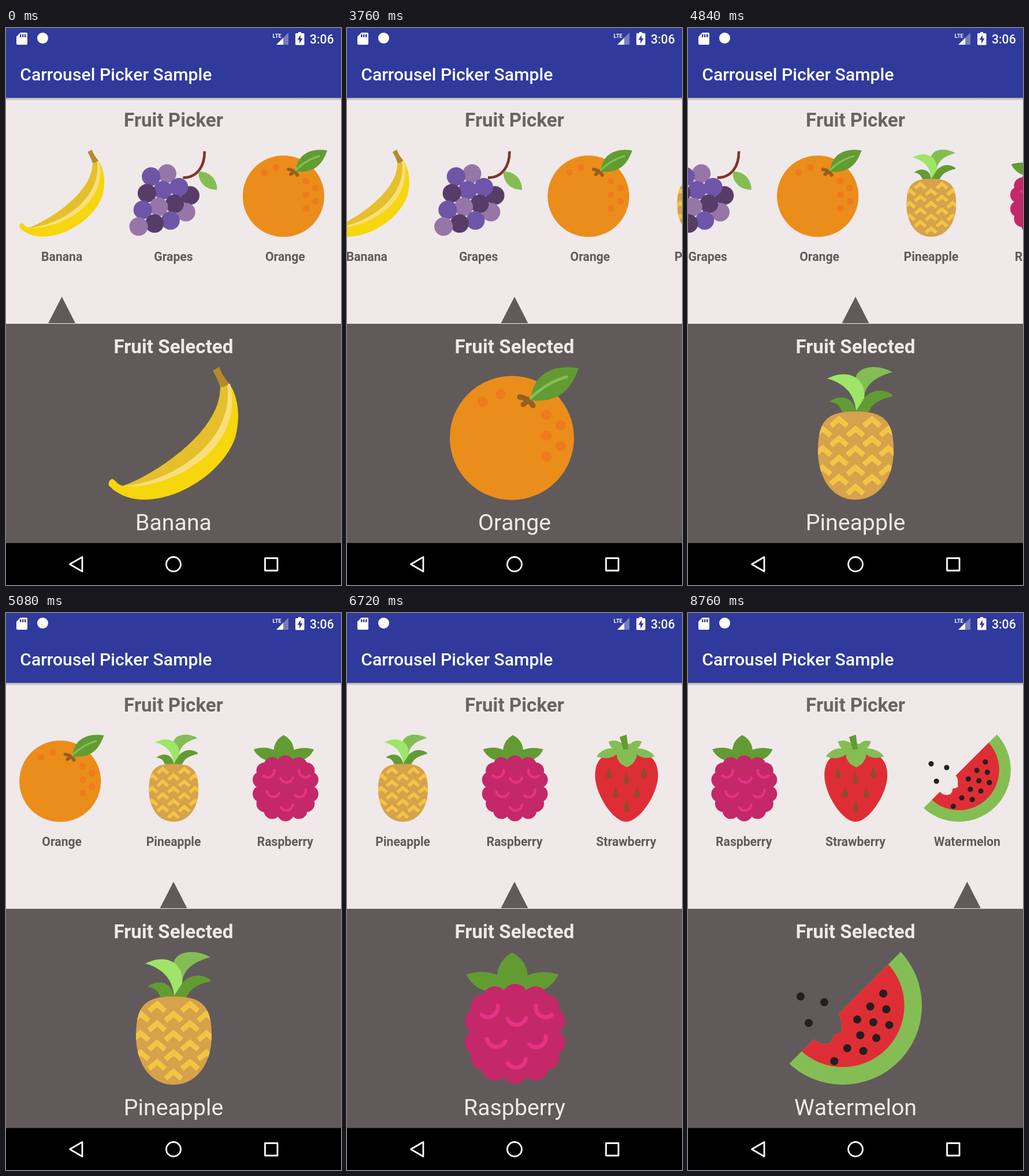
Recreate the animation shown at these times as an HTML page. Size 580 by 966 pixels, loop 8.8 s.

```html
<!DOCTYPE html>
<html lang="en">
<head>
<meta charset="utf-8">
<title>Carrousel Picker Sample</title>
<style>
  html, body { margin: 0; width: 100%; height: 100%; overflow: hidden; background: #000; }
  svg { display: block; width: 100vw; height: 100vh; font-family: Roboto, sans-serif; }
  .mid { text-anchor: middle; }
  .head { font-size: 33.2px; font-weight: 700; }
  .name { font-size: 21.15px; font-weight: 700; fill: #615a5a; }
  .line { fill: none; stroke-linecap: round; stroke-linejoin: round; }
  #pickedName { font-size: 39.27px; font-kerning: none; fill: #efe9e9; }
</style>
</head>
<body>
<svg viewBox="0 0 580 966">
  <defs>
    <linearGradient id="shade" x2="0" y2="1">
      <stop stop-color="#000" stop-opacity=".3"/>
      <stop offset="1" stop-color="#000" stop-opacity="0"/>
    </linearGradient>
    <clipPath id="pineBody"><path d="M290 665C338 665 356 680 356 733C356 780 331 818 290 818C249 818 225 780 225 733C225 680 242 665 290 665Z"/></clipPath>
    <clipPath id="slice"><path d="M368 588H420V830H127L218 739Q232 752 246 745Q252 738 252 730Q262 731 267 724Q264 720 266 712Q265 700 260 696Z"/></clipPath>

    <g id="Banana" transform="translate(175 588)">
      <path fill="#f6d60d" d="M196 34L211 28C228 52 231 88 222 122C202 180 128 230 64 230C36 230 14 218 3 205C2 199 5 195 9 194C15 196 18 205 28 206C75 190 198 115 196 34Z"/>
      <path fill="#e5c02c" d="M28 206C75 190 198 115 196 34L208 30C222 140 95 204 28 206Z"/>
      <path fill="#f9de7e" d="M28 206C95 204 222 140 208 30L213 29C240 145 105 214 28 206Z"/>
      <path fill="#b58a2d" d="M183 6L194 0Q200 16 211 28Q206 35 196 35Q192 22 183 6Z"/>
    </g>

    <g id="Grapes">
      <path fill="none" stroke="#81342a" stroke-width="7" d="M372 592C372 632 353 662 315 662"/>
      <path fill="#85bd55" d="M356 646C385 645 405 665 405 694C375 694 355 675 356 646Z"/>
    </g>

    <g id="Orange">
      <circle cx="285.5" cy="711" r="107.5" fill="#eb8d1b"/>
      <path class="line" stroke="#975f20" stroke-width="9" d="M299 640Q315 642 322 655M305 653L317 644"/>
      <path fill="#639b33" d="M401 590C360 583 321 598 318 646C365 650 387 630 401 590Z"/>
      <path class="line" stroke="#85bd55" stroke-width="5" d="M318 642Q345 615 380 605"/>
    </g>

    <g id="Pineapple">
      <path fill="#639b33" d="M245 648C265 634 287 640 291 666H267C262 652 255 650 245 648ZM354 636C328 618 300 636 291 666H313C319 650 335 643 354 639Z"/>
      <path fill="#85bd55" d="M354 597C325 580 288 588 290 612L305 642C306 616 330 603 354 597Z"/>
      <path fill="#9fe567" d="M241 608C275 590 309 605 305 642L291 664C288 632 268 615 241 608Z"/>
      <g clip-path="url(#pineBody)">
        <path fill="#d6a24c" d="M220 660h140v160H220Z"/>
        <path id="chevrons" fill="none" stroke="#f2c544" stroke-width="9"/>
      </g>
    </g>

    <g id="Raspberry">
      <path fill="#639b33" d="M286 589C302 597 312 612 313 628C332 621 350 622 366 627C355 650 335 660 313 656H260C235 660 215 645 207 627C225 620 245 621 260 628C261 612 270 597 286 589Z"/>
      <circle cx="291" cy="730" r="66" fill="#c42869"/>
    </g>

    <g id="Strawberry">
      <path fill="#df2d35" d="M290 818C255 818 208 745 208 695C208 665 222 640 250 640H332C360 640 374 665 374 695C374 745 325 818 290 818Z"/>
      <path fill="#85bd55" d="M212 646C222 628 245 622 255 625C248 620 245 612 244 606C258 601 270 604 280 612H302C310 602 322 603 331 606C328 615 325 620 320 624C340 624 360 635 365 646C345 652 330 650 318 640C318 655 305 670 292 674C275 668 265 655 265 640C250 652 230 652 212 646Z"/>
      <path fill="#639b33" d="M273 594L291 588L296 626L283 628Z"/>
    </g>

    <g id="Watermelon">
      <g clip-path="url(#slice)">
        <circle cx="268" cy="681" r="137" fill="#85bd55"/>
        <circle cx="268" cy="681" r="106.5" fill="#df2d35"/>
      </g>
    </g>
  </defs>

  <path fill="#efe9e9" d="M0 121h580v392H0Z"/>
  <path fill="url(#shade)" d="M0 121h580v5H0Z"/>
  <path fill="#2f3a9c" d="M0 0h580v121H0Z"/>
  <path fill="#615a5a" d="M0 513h580v380.5H0Z"/>
  <path d="M0 893.5h580V966H0Z"/>

  <g fill="#fff">
    <path d="M25 8H35Q37 8 37 10V27Q37 29 35 29H20Q18 29 18 27V15Z"/>
    <path fill="#2f3a9c" d="M24 11h2.4v5H24zM28 11h2.4v5H28zM32 11h2.4v5H32z"/>
    <circle cx="63.5" cy="17.5" r="9.5"/>
    <text x="461.5" y="16.5" font-size="9.5" font-weight="700">LTE</text>
    <path fill-opacity=".35" d="M489 8V29H468Z"/>
    <path d="M480 17V29H468Z"/>
    <path d="M506 7h5v2h4q1.5 0 1.5 1.5V28q0 1.5-1.5 1.5H502.5q-1.5 0-1.5-1.5V10.5Q501 9 502.5 9H506Z"/>
    <path fill="#2f3a9c" d="M510 12L504.5 20.5H508V27L513.5 18H510Z"/>
    <text x="526" y="26.5" font-size="21.15" font-weight="500">3:06</text>
    <text x="24.2" y="91" font-size="30.2" font-weight="500">Carrousel Picker Sample</text>
  </g>

  <text class="mid head" x="290" y="171" fill="#6b6464">Fruit Picker</text>
  <g id="list"></g>
  <path id="arrow" fill="#615a5a" d="M0 466L23.5 512H-23.5Z"/>
  <text class="mid head" x="290" y="564" fill="#efe9e9">Fruit Selected</text>
  <use id="picked"/>
  <text id="pickedName" class="mid" x="290" y="871"></text>

  <g class="line" stroke="#fff" stroke-width="2.8">
    <path d="M110.5 930L132 917.5V942.5Z"/>
    <circle cx="290" cy="930" r="12.5"/>
    <path d="M448.5 919.5h21.5v21.5h-21.5Z"/>
  </g>
</svg>
<script>
  const $ = id => document.getElementById(id);
  const add = (id, markup) => $(id).insertAdjacentHTML('beforeend', markup);
  const dot = (id, x, y, r, fill) => add(id, `<circle cx="${x}" cy="${y}" r="${r}" fill="${fill}"/>`);
  const times = (n, draw) => { for (let i = 0; i < n; i++) draw(i); };

  // Grapes: a slanted lattice whose last column droops
  const skins = { P: '#6e55a8', M: '#9676a8', D: '#573c68' };
  ['PM', 'DPPD', 'PMDM', 'MDP'].forEach((row, r) => {
    for (let c = row.length - 1; c >= 0; c--) {
      const droop = c * (c - 1) * (c - 2);
      dot('Grapes', 231 - 11 * r + 42 * c - 2 * droop, 659 + 44 * r - 8 * c + 5 * droop, 24.5, skins[row[c]]);
    }
  });

  // Orange pores: two at the top, a zigzag on the right
  times(2, i => dot('Orange', 235 + 31 * i, 648 - 13 * i, 9, '#f07a1e'));
  times(5, i => dot('Orange', 345 + 25 * (i % 2), 671 + 18 * i, 9, '#f07a1e'));

  let chevrons = '';
  times(5, col => times(4, row => {
    chevrons += `M${219 + col * 28.5} ${(col % 2 ? 690 : 707) + row * 33.5}l14-12l14 12`;
  }));
  $('chevrons').setAttribute('d', chevrons);

  // Raspberry outline: a ring of bumps, squarer at the top
  const bend = (v, power) => Math.sign(v) * Math.abs(v) ** power;
  times(14, i => {
    const angle = Math.PI * (i / 7 + .5), up = Math.sin(angle);
    dot('Raspberry', 291 + 66 * bend(Math.cos(angle), .75), 730 + 65 * bend(up, up < 0 ? .7 : 1), 22, '#c42869');
  });

  // Rows of three, two and one marks
  function triangle(centre, top, step, widen, draw) {
    let index = 0;
    times(3, r => times(3 - r, c => {
      const x = centre + (c - (2 - r) / 2) * (step + widen * r);
      const y = top + 60 * r - 8 * r * r + 14 * c * (2 - r - c);
      draw(x, y, index++);
    }));
  }
  triangle(294, 689, 47, 25, (x, y, i) => add('Raspberry',
    `<path class="line" stroke="#e63383" stroke-width="7" d="M-16 0A17 17 0 0 0 16 0"
      transform="translate(${x} ${y}) rotate(${-29 * Math.cos(i * 85 * Math.PI / 180)})"/>`));
  triangle(290.5, 687, 46.5, 9.5, (x, y) => add('Strawberry',
    `<path fill="#97492b" transform="translate(${x} ${y})" d="M0-17C2-6 8 4 8 9A8 8 0 0 1-8 9C-8 4-2-6 0-17Z"/>`));

  // Watermelon seeds: rows parallel to the cut, plus three loose ones
  const seed = (x, y) => dot('Watermelon', x, y, 7, '#231f20');
  [3, 5, 3].forEach((count, r) => times(count, c => {
    const depth = 42 + 32.5 * r, along = -322 - 45 * c - 22 * r;
    seed((956 + depth + along) / 2, (956 + depth - along) / 2);
  }));
  seed(195, 665);
  seed(236, 675);
  seed(209, 711);

  // Carousel
  const fruits = ['Banana', 'Grapes', 'Orange', 'Pineapple', 'Raspberry', 'Strawberry', 'Watermelon'];
  const slot = 580 / 3, loop = 8800, tick = 40;
  const picks = [0, 2600, 3760, 4840, 6440, 7440, 8520];
  const scrolls = [3760, 4840, 6480, 7440];

  fruits.forEach((fruit, i) => {
    const x = slot * (i + .5);
    add('list', `<use href="#${fruit}" transform="translate(${x} 286.5) scale(.6565) translate(-290 -703)"/>
      <text class="mid name" x="${x}" y="404">${fruit}</text>`);
  });

  // Quintic ease-out, settled once the remainder is negligible
  const glide = t => t < 0 ? 0 : t >= 240 ? 1 : 1 - (1 - (t + 30) / 400) ** 5;

  let shown = -1;
  function draw(now) {
    const time = Math.floor(now % loop / tick) * tick;
    const index = picks.filter(start => start <= time).length - 1;
    const shift = scrolls.reduce((sum, start) => sum + glide(time - start), 0);
    $('list').setAttribute('transform', `translate(${-slot * shift} 0)`);
    if (index !== shown) {
      shown = index;
      const place = index === 0 ? 0 : index === fruits.length - 1 ? 2 : 1;
      $('arrow').setAttribute('transform', `translate(${slot * (place + .5)} 0)`);
      $('picked').setAttribute('href', '#' + fruits[index]);
      $('pickedName').textContent = fruits[index];
    }
  }

  const begin = performance.now();
  function frame() {
    draw(performance.now() - begin);
    requestAnimationFrame(frame);
  }
  frame();
</script>
</body>
</html>
```
